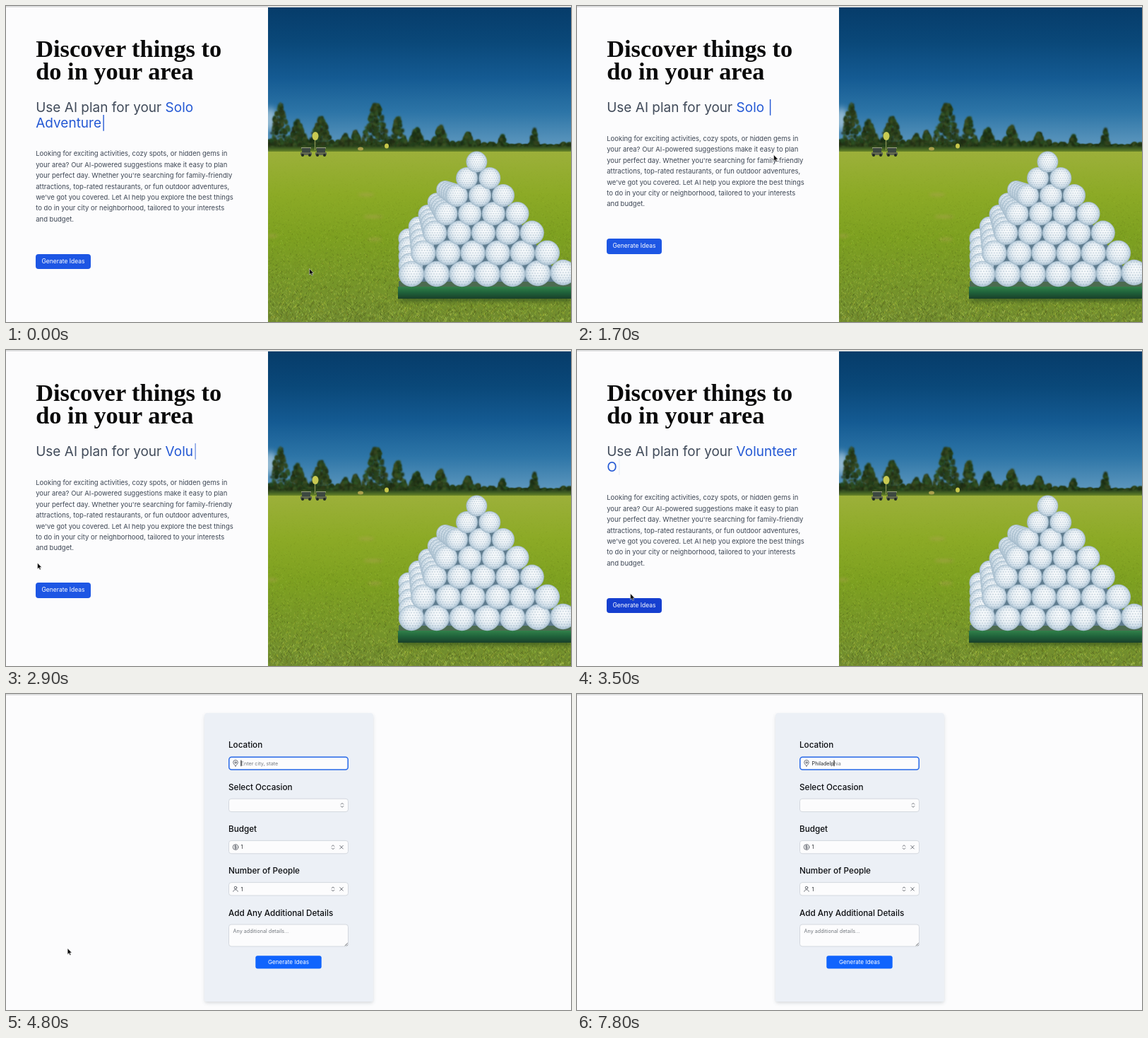
Write an HTML page with a canvas that moves like this. It is 800 px wide and 447 px high and loops after 8000 ms.

```html
<!DOCTYPE html>
<html lang="en">
<head>
<meta charset="utf-8">
<title>Discover things to do</title>
<style>
  html, body { margin: 0; width: 100%; height: 100%; overflow: hidden; background: #fcfcfd; }
  body { position: relative; font-family: Inter, sans-serif; font-optical-sizing: none; }
  #landing, #form, #photo, #strip, #pointer { position: absolute; left: 0; top: 0; }
  #strip { width: 800px; height: 1.5px; background: #dedfe0; }
  #photo { left: 371px; top: 2px; }
  #copy { position: absolute; left: 42.2px; top: 44.4px; width: 286px; }
  h1 { margin: 0; height: 88.8px; font: bold 34.4px/32px "Liberation Serif", serif; color: #0a0a0a; white-space: nowrap; }
  #lead { font-size: 19px; line-height: 21.33px; color: #414b5a; }
  #lead span { color: #2358d4; }
  #caret { animation: blink .8s infinite paused; }
  @keyframes blink { from { opacity: 0 } to { opacity: 1 } }
  p { margin: 25.6px 0 41.8px; font-size: 9.51px; line-height: 15.36px; color: #3d4654; white-space: nowrap; }
  #go { width: 77.6px; height: 21.3px; border-radius: 4px; background: #1d56e4; color: #fff;
        font-size: 8.5px; line-height: 21.3px; text-align: center; }
  #go.hover { background: #153fd0; }
  .label { font-size: 11.7px; font-weight: 500; fill: #0b0d10; }
  .field { font-size: 7.2px; fill: #1f2328; }
  .hint { fill: #73787f; }
  .box { fill: #fcfcfd; stroke: #ccd1d8; stroke-width: .8; }
  .focus { stroke: #2668e8; stroke-width: 1.5; }
  .icon { fill: none; stroke: #4b5058; stroke-width: .8; stroke-linecap: round; stroke-linejoin: round; }
</style>
</head>
<body>
<div id="landing">
  <div id="copy">
    <h1>Discover things to<br>do in your area</h1>
    <div id="lead">Use AI plan for your <span id="plan"></span><span id="caret">|</span></div>
    <p>Looking for exciting activities, cozy spots, or hidden gems in<br>
      your area? Our AI-powered suggestions make it easy to plan<br>
      your perfect day. Whether you're searching for family-friendly<br>
      attractions, top-rated restaurants, or fun outdoor adventures,<br>
      we've got you covered. Let AI help you explore the best things<br>
      to do in your city or neighborhood, tailored to your interests<br>
      and budget.</p>
    <div id="go">Generate Ideas</div>
  </div>
  <canvas id="photo" width="429" height="445"></canvas>
</div>

<svg id="form" width="800" height="447">
  <defs>
    <filter id="shade" x="-10%" y="-10%" width="120%" height="120%">
      <feDropShadow dx="0" dy="2.5" stdDeviation="2" flood-color="#526070" flood-opacity=".2"/>
    </filter>
    <path id="updown" class="icon" d="M-1.8-1.2 0-3 1.8-1.2M-1.8 1.2 0 3 1.8 1.2"/>
    <path id="cross" class="icon" d="M-2.3-2.3 2.3 2.3M2.3-2.3-2.3 2.3"/>
  </defs>
  <rect x="281" y="27" width="239" height="408" rx="4" fill="#ecf0f6" filter="url(#shade)"/>
  <g class="label">
    <text x="315" y="76.3">Location</text>
    <text x="315" y="135.6">Select Occasion</text>
    <text x="315" y="194.9">Budget</text>
    <text x="315" y="254.2">Number of People</text>
    <text x="315" y="313.5">Add Any Additional Details</text>
  </g>
  <rect class="box focus" x="315.8" y="89.2" width="168.4" height="17.8" rx="3.5"/>
  <rect class="box" x="315.5" y="148.2" width="169" height="18.4" rx="3.5"/>
  <rect class="box" x="315.5" y="207.4" width="169" height="18.4" rx="3.5"/>
  <rect class="box" x="315.5" y="266.6" width="169" height="18.4" rx="3.5"/>
  <rect class="box" x="315.5" y="326" width="169" height="31" rx="3.5"/>
  <path class="icon" d="M325 102C322.8 99.4 321.7 98 321.7 96.8a3.3 3.3 0 0 1 6.6 0C328.3 98 327.2 99.4 325 102Z"/>
  <circle class="icon" cx="325" cy="97" r="1.2"/>
  <circle class="icon" cx="325" cy="216.6" r="3.8"/>
  <path class="icon" d="M326.5 215.3c-.5-1-2.9-1-2.9.2 0 1.4 3 .8 3 2.2 0 1.2-2.6 1.2-3.1.1M325 213.8v5.6"/>
  <circle class="icon" cx="325" cy="274" r="1.8"/>
  <path class="icon" d="M321.8 279.4c0-3.6 6.4-3.6 6.4 0"/>
  <use href="#updown" x="476" y="157.3"/>
  <use href="#updown" x="463" y="216.7"/><use href="#cross" x="475" y="216.7"/>
  <use href="#updown" x="463" y="275.9"/><use href="#cross" x="475" y="275.9"/>
  <path class="icon" d="M480 356l3.5-3.5M482.3 356l1.2-1.2"/>
  <g class="field">
    <text x="332.6" y="100.7"><tspan id="typed"></tspan><tspan id="ghost" class="hint"></tspan></text>
    <text x="332.6" y="219.2">1</text>
    <text x="332.6" y="278.5">1</text>
    <text x="321.6" y="338" class="hint">Any additional details...</text>
  </g>
  <rect id="bar" y="93.6" width="1" height="8.6" fill="#111"/>
  <rect x="353.3" y="370.3" width="93.4" height="18.2" rx="3" fill="#1064fd"/>
  <text x="400" y="382.4" text-anchor="middle" font-size="8.1" fill="#fff">Generate Ideas</text>
</svg>

<div id="strip"></div>
<svg id="pointer" width="10" height="14">
  <path d="M.6.6V9.2L2.6 7.4 3.9 10.4 5.4 9.8 4.1 6.9H6.7Z" fill="#0a0a0a" stroke="#fff" stroke-width=".5"/>
</svg>

<script>
const $ = id => document.getElementById(id);

function paintPhoto() {
  const g = $('photo').getContext('2d');
  g.translate(-371, -2);
  let seed = 7;
  const rnd = (a = 0, b = 1) => {
    seed = (seed * 1664525 + 1013904223) >>> 0;
    return a + (b - a) * seed / 2 ** 32;
  };
  const shadeDown = (y0, y1, ...colors) => {
    const grad = g.createLinearGradient(0, y0, 0, y1);
    colors.forEach((c, i) => grad.addColorStop(i / (colors.length - 1), c));
    return grad;
  };
  const rect = (x, y, w, h, fill) => { g.fillStyle = fill; g.fillRect(x, y, w, h); };
  const oval = (x, y, rx, ry, fill) => {
    g.fillStyle = fill;
    g.beginPath();
    g.ellipse(x, y, rx, ry, 0, 0, 7);
    g.fill();
  };

  // Sky and distant trees
  rect(371, 2, 429, 206, shadeDown(2, 200, '#063c6a', '#0a4879', '#145a92', '#2d75a7', '#6099bf'));
  g.filter = 'blur(5px)';
  oval(374, 160, 10, 16, '#c3d9e5aa');
  g.filter = 'blur(1px)';
  const tree = (x, top, w) => {
    for (let i = 0; i < w * 6; i++) {
      const f = rnd() ** .7;
      const spread = w / 2 * Math.min(1, .12 + f * 1.2);
      oval(x + rnd(-spread, spread), top + 2 + f * (200 - top), rnd(1.2, 3), rnd(1.5, 3.5),
        `hsl(${rnd(80, 115)} 38% ${rnd(12, 25)}%)`);
    }
  };
  for (let x = 371; x < 690; x += 9) tree(x, 188 + rnd(0, 6), 13);
  for (let x = 690; x < 802; x += 9) tree(x, 193 + rnd(0, 4), 13);
  [[388, 135, 30], [413, 160, 27], [446, 155, 32], [480, 179, 15], [495, 175, 15], [524, 135, 38],
   [555, 155, 22], [581, 171, 22], [615, 169, 24], [654, 178, 20], [703, 180, 11], [748, 173, 10]]
    .forEach(t => tree(...t));
  rect(371, 199, 429, 9, shadeDown(199, 208, '#304b20', '#506f25', '#849d2c'));

  // Lawn
  g.filter = 'none';
  rect(371, 206, 429, 241, shadeDown(206, 447, '#9cb03a', '#8caa26', '#7da020', '#769628', '#708a31'));
  g.filter = 'blur(2px)';
  [[520, 298, 14], [377, 325, 8], [522, 330, 10], [510, 267, 12]].forEach(([x, y, r]) => oval(x, y, r, 2.2, '#afa35488'));
  g.filter = 'none';
  for (let i = 0; i < 13000; i++) {
    const f = rnd() ** .7, y = 208 + f * 240, x = rnd(371, 800), len = .5 + f * 2.6;
    g.strokeStyle = `hsla(${rnd(62, 82)}, 58%, ${rnd(14, 64)}%, ${.06 + f * .4})`;
    g.lineWidth = .4 + f * .6;
    g.beginPath();
    g.moveTo(x, y);
    g.lineTo(x + rnd(-len, len), y - len);
    g.stroke();
  }

  // Carts and flags
  g.filter = 'blur(.6px)';
  for (const x of [425, 446]) {
    rect(x - 7, 200, 14, 1.5, '#9a9f83');
    rect(x - 6, 201, 12, 7, '#3c4840');
    rect(x - 8, 207, 16, 4, '#60664f');
    oval(x - 5, 211, 2, 2, '#202a22');
    oval(x + 5, 211, 2, 2, '#202a22');
  }
  rect(437, 184, 1, 20, '#8f9a58');
  oval(438, 184, 4.5, 6, '#c8ca52');
  oval(539, 198, 3, 3.5, '#c6c64a');
  oval(502, 202, 4, 2.5, '#aaa04c');

  // Tray
  g.filter = 'blur(3px)';
  rect(558, 409, 242, 8, '#2f4d1dbb');
  g.filter = 'none';
  rect(556, 389, 244, 14, '#4c6b50');
  rect(555, 397, 245, 17, shadeDown(397, 414, '#31814a', '#1f613a', '#193f29'));

  const ball = (x, y, r) => {
    const grad = g.createRadialGradient(x + r * .1, y - r * .3, r * .1, x, y, r);
    [[0, '#f6f9fb'], [.5, '#e9f0f5'], [.82, '#cddce7'], [1, '#9fb7c8']].forEach(s => grad.addColorStop(...s));
    oval(x, y, r, r, grad);
    for (let v = -4; v <= 4; v++)
      for (let u = -4; u <= 4; u++) {
        const a = (u + (v & 1) / 2) * .21, b = v * .2;
        if (a * a + b * b < .74) oval(x + a * r, y + b * r, r * .055, r * .045, '#8aa3b67a');
      }
  };
  const row = k => ({
    x: 574 + 17.2 * k - .3 * k * k, y: 379 - 30.5 * k + .68 * k * k, r: 18.2 - .55 * k, gap: 35.8 - .7 * k,
    backX: 4 + 3 * k, backY: 50 - 13.5 * k + .75 * k * k
  });
  // Dark gaps between the balls
  g.fillStyle = '#5f7c8f';
  g.beginPath();
  g.moveTo(574, 390);
  g.lineTo(667, 222);
  g.lineTo(789, 390);
  g.fill();
  for (let k = 0; k < 7; k++) {
    const { x, y, r, gap, backX, backY } = row(k);
    // The side face recedes up and to the left
    if (k < 5)
      for (let f = 1; f > 0; f -= .25) ball(x - f * backX, y - f * backY, r * (1 - f * .2));
    for (let i = 6 - k; i >= 0; i--) ball(x + i * gap, y - (i > 4 && !k ? i - 4 : 0), r);
  }
}

const path = [[0, 429, 371], [1700, 278, 210], [2400, 222, 244], [3000, 30, 305], [3500, 75, 344],
  [4300, 80, 359], [4700, 80, 359], [5900, 406, 370], [6000, 406, 370], [6300, 367, 103], [8000, 367, 103]];

function pointerAt(t) {
  const i = path.findIndex(p => p[0] > t);
  const [t0, x0, y0] = path[i - 1], [t1, x1, y1] = path[i];
  const f = (t - t0) / (t1 - t0), e = f * f * (3 - 2 * f);
  return [x0 + (x1 - x0) * e, y0 + (y1 - y0) * e];
}

const steps = (elapsed, each, max) => Math.max(0, Math.min(max, Math.floor(elapsed / each)));
const city = 'Philadelphia';
const formAt = 4700;

function render(t) {
  const landing = t < formAt;
  $('landing').style.display = landing ? '' : 'none';
  $('form').style.display = landing ? 'none' : '';

  const [x, y] = pointerAt(t);
  $('pointer').style.transform = `translate(${x}px, ${y}px)`;

  if (landing) {
    $('plan').textContent = t < 2500
      ? 'Solo Adventure'.slice(0, 14 - steps(t - 510, 130, 14))
      : 'Volunteer Opportunity'.slice(0, steps(t - 2506, 84, 21));
    $('caret').style.animationDelay = -((t + 570) % 800) + 'ms';
    $('go').className = t > 3200 ? 'hover' : '';
  }

  const count = steps(t - 6850, 105, 9);
  $('typed').textContent = city.slice(0, count);
  $('ghost').textContent = !count ? 'Enter city, state' : count > 4 ? city.slice(count) : '';
  $('bar').setAttribute('x', 332.4 + (count && $('typed').getComputedTextLength()));
  $('bar').style.opacity = count || (t - formAt) % 1000 < 500 ? 1 : 0;
  $('pointer').style.opacity = count ? 0 : 1;
}

paintPhoto();
const start = performance.now();
function tick() {
  render((performance.now() - start) % 8000);
  requestAnimationFrame(tick);
}
tick();
</script>
</body>
</html>
```
